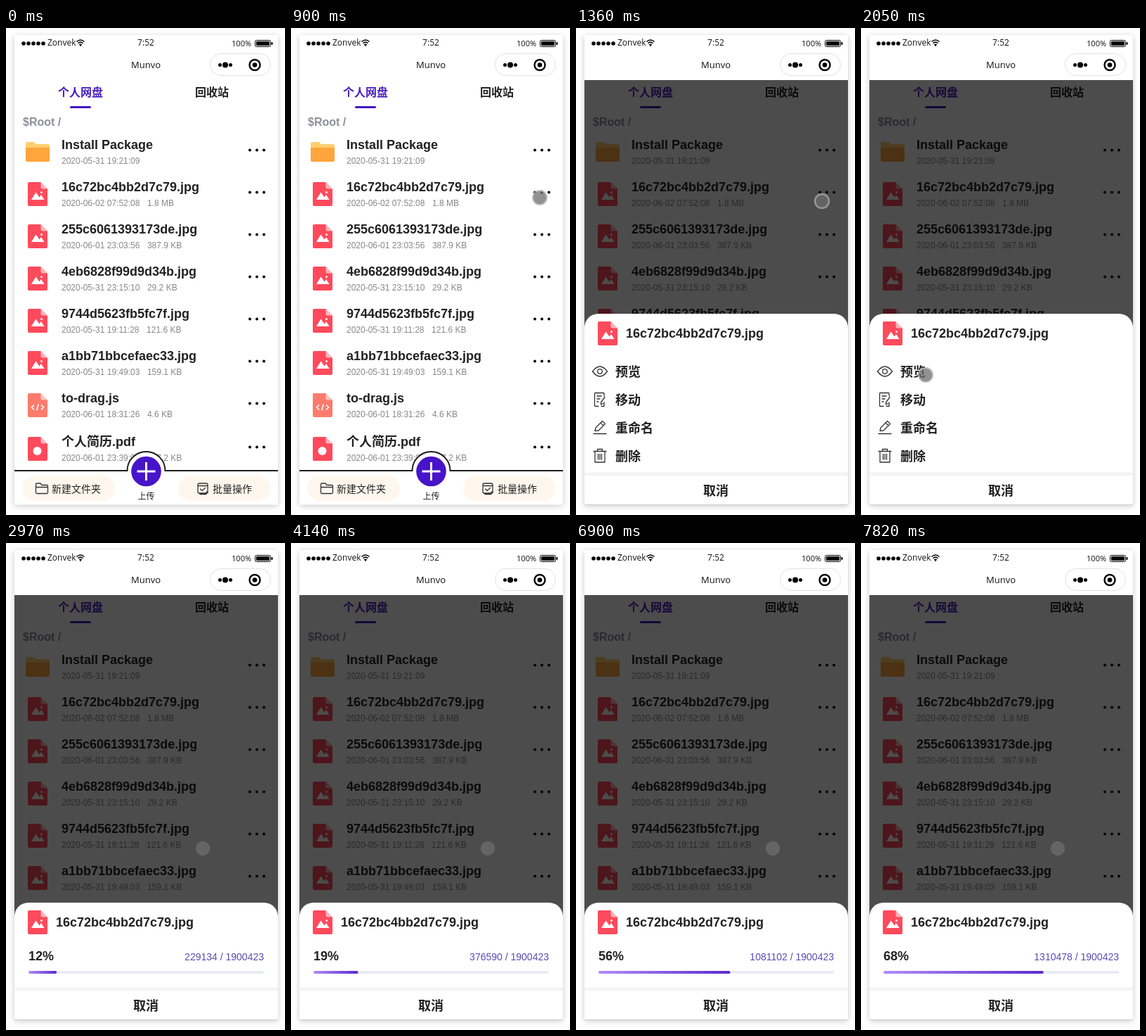
Recreate the animation shown at these times as an HTML page. Size 397x692 px, loop 8000 ms.

```html
<!DOCTYPE html>
<html lang="zh">
<head>
<meta charset="utf-8">
<title>个人网盘</title>
<style>
  html, body { margin: 0; width: 100%; height: 100%; overflow: hidden; background: #fff; }
  svg { display: block; width: 397px; height: 692px; }
  text { font-family: "Liberation Sans", Arial, "Noto Sans CJK SC", "Noto Sans CJK", sans-serif; fill: #222; }
  .ui { font-family: "Open Sans", "Noto Sans", sans-serif; fill: #111; }
  .name { font-size: 18px; font-weight: 700; }
  .meta { font-size: 12px; fill: #888; }
  .tab { font-size: 16px; font-weight: 700; }
  .label { font-size: 14px; fill: #222; }
  .mid { text-anchor: middle; }
  .end { text-anchor: end; }
  .line { fill: none; stroke: #333; stroke-width: 1.3; stroke-linejoin: round; stroke-linecap: round; }
  .card { fill: #fff; filter: drop-shadow(0 2px 4px rgba(0, 0, 0, .22)); }
  #count { font-size: 14px; fill: #5a4bb4; }
  #cursor { fill: rgba(108, 108, 108, .75); }
</style>
</head>
<body>
<svg viewBox="0 0 397 692">
  <defs>
    <clipPath id="frame"><rect x="12" y="10" width="375" height="667.5"/></clipPath>
    <linearGradient id="fade">
      <stop offset="0" stop-color="#b08cfa"/>
      <stop offset="1" stop-color="#5b2bd0"/>
    </linearGradient>
    <g id="sheetOfPaper">
      <path d="M2 0H18.500L28 9.500V32a2 2 0 0 1-2 2H2a2 2 0 0 1-2-2V2a2 2 0 0 1 2-2z"/>
      <path d="M18.500 0L28 9.500H20.500a2 2 0 0 1-2-2z" fill="#fff" fill-opacity=".58"/>
    </g>
    <g id="jpg">
      <use href="#sheetOfPaper" fill="#ff4a5c"/>
      <path d="M5 25L11.500 14.500 16.500 21.500 19 18 23.500 25z" fill="#fff"/>
      <circle cx="19.500" cy="14.500" r="1.500" fill="#fff"/>
    </g>
    <g id="js">
      <use href="#sheetOfPaper" fill="#fc7b6c"/>
      <path d="M9 16.500L5.500 20 9 23.500M19 16.500L22.500 20 19 23.500M15.300 15.500L12.700 24.500"
        fill="none" stroke="#fff" stroke-width="1.600"/>
    </g>
    <g id="pdf">
      <use href="#sheetOfPaper" fill="#ff4a5c"/>
      <circle cx="13.500" cy="20" r="6" fill="#fff"/>
    </g>
    <g id="folder">
      <path d="M-3 5a2 2 0 0 1 2-2H9l3 3H29a2 2 0 0 1 2 2V14H-3z" fill="#ffcf6e"/>
      <path d="M-3 11H31V29a2 2 0 0 1-2 2H-1a2 2 0 0 1-2-2z" fill="#ffa53c"/>
    </g>
  </defs>

  <rect class="card" x="12" y="10" width="375" height="667"/>

  <g clip-path="url(#frame)">
    <!-- status bar and title bar -->
    <g id="signal" fill="#000"></g>
    <text class="ui" x="59" y="25" font-size="12">Zonvek</text>
    <g fill="none" stroke="#000" stroke-width="1.500">
      <path d="M100.500 19.500Q106 14.500 111.500 19.500M102.500 21.800Q106 18.500 109.500 21.800M104.300 24Q106 22.300 107.700 24"/>
      <rect x="354.500" y="17.500" width="22" height="9" rx="2" stroke-width="1"/>
    </g>
    <circle cx="106" cy="25" r="1"/>
    <rect x="356" y="19" width="19" height="6" rx="1"/>
    <rect x="377.500" y="20" width="2" height="4" rx="1"/>
    <text class="ui mid" x="199" y="25" font-size="12">7:52</text>
    <text class="ui end" x="349" y="26" font-size="11">100%</text>
    <text class="ui mid" x="199" y="57" font-size="13">Munvo</text>
    <rect x="290.500" y="36.500" width="86" height="31" rx="15.500" fill="#fff" stroke="#e2e2e2"/>
    <circle cx="304.500" cy="52.500" r="2.500"/><circle cx="312" cy="52.500" r="4"/><circle cx="319.500" cy="52.500" r="2.500"/>
    <circle cx="354" cy="52.500" r="7.500" fill="none" stroke="#000" stroke-width="2.400"/>
    <circle cx="354" cy="52.500" r="3.300"/>

    <!-- file list -->
    <text class="tab mid" x="106" y="97" style="fill:#4a1fc0">个人网盘</text>
    <rect x="91" y="111" width="30" height="3" rx="1.500" fill="#4615c4"/>
    <text class="tab mid" x="293" y="97">回收站</text>
    <text class="tab" x="24" y="139" style="fill:#8f8f9b">$Root /</text>
    <g id="list"></g>

    <!-- bottom bar -->
    <path d="M10 629H172.500A27 27 0 0 1 226.500 629H390V680H10z" fill="#fff" stroke="#1c1c1c" stroke-width="2"/>
    <circle cx="199.500" cy="630" r="21.300" fill="#4714c9"/>
    <path d="M199.500 617V643M186.500 630H212.500" stroke="#fff" stroke-width="3"/>
    <text class="mid" x="199.500" y="670" font-size="12">上传</text>
    <rect x="23" y="636" width="132" height="36" rx="18" fill="#fff7ee"/>
    <rect x="245" y="636" width="131" height="36" rx="18" fill="#fff7ee"/>
    <path class="line" d="M42.500 648.500a1.500 1.500 0 0 1 1.500-1.500h5l2 2.500h7a1.500 1.500 0 0 1 1.500 1.500v9a1.500 1.500 0 0 1-1.500 1.500h-14a1.500 1.500 0 0 1-1.500-1.500zM42.500 652.500h17"/>
    <text class="label" x="65" y="660">新建文件夹</text>
    <path class="line" d="M275 647h10a2 2 0 0 1 2 2v9l-3 3h-9a2 2 0 0 1-2-2v-10a2 2 0 0 1 2-2zM273 650.500h14M276.500 655l2.500 2.500 4.500-4M275 661.500l1.500 1h8l3-3"/>
    <text class="label" x="294" y="660">批量操作</text>

    <rect id="shade" x="12" y="74" width="375" height="604"/>

    <!-- action menu, drawn from its own top edge -->
    <g id="menu">
      <path d="M12 274V20a20 20 0 0 1 20-20H367a20 20 0 0 1 20 20V274z" fill="#fff"/>
      <use href="#jpg" x="31" y="11"/>
      <text class="name" x="71" y="34">16c72bc4bb2d7c79.jpg</text>
      <g class="line">
        <path d="M23.500 82Q34 68 44.500 82Q34 96 23.500 82z"/>
        <circle cx="34" cy="82" r="3.300"/>
        <path d="M40 117V113.500a1 1 0 0 0-1-1H27.500a1 1 0 0 0-1 1V130.500a1 1 0 0 0 1 1H32M30 117H36M30 121H34M30 125H32M41 118.500L35.500 126V129L38.500 127.500M36 131.500H40V126"/>
        <path d="M27 166.500L28 162 37.500 152.500 41.500 156.500 32 166 27 166.500M35 155L39 159M25 170.500H43"/>
        <path d="M25 195.500H43M30.500 195.500V192.500H37.500V195.500M27 195.500V211H41V195.500M31.500 199.500V207M34 199.500V207M36.500 199.500V207"/>
      </g>
      <g id="actions"></g>
      <rect x="12" y="225.500" width="375" height="5" fill="#f4f4f4"/>
      <text class="name mid" x="199" y="257.500">取消</text>
    </g>

    <!-- download panel -->
    <g id="load">
      <path d="M12 680V531a20 20 0 0 1 20-20H367a20 20 0 0 1 20 20V680z" fill="#fff"/>
      <use href="#jpg" x="31" y="522"/>
      <text class="name" x="71" y="545">16c72bc4bb2d7c79.jpg</text>
      <text class="name" id="percent" x="32" y="593"></text>
      <text class="end" id="count" x="367" y="593"></text>
      <rect x="32" y="608" width="335" height="4" rx="2" fill="#e9ebf2"/>
      <rect id="bar" x="32" y="608" height="4" rx="2" fill="url(#fade)"/>
      <rect x="12" y="631.500" width="375" height="5" fill="#f4f4f4"/>
      <text class="name mid" x="199" y="663.500">取消</text>
    </g>
  </g>
  <circle id="cursor"/>
</svg>

<script>
  const $ = id => document.getElementById(id);
  const set = (id, attrs) => {
    for (const key in attrs) $(id).setAttribute(key, attrs[key]);
  };
  const dots = (xs, y, r) => xs.map(x => `<circle cx="${x}" cy="${y}" r="${r}"/>`).join('');

  const files = [
    ['folder', 'Install Package', '2020-05-31 19:21:09', ''],
    ['jpg', '16c72bc4bb2d7c79.jpg', '2020-06-02 07:52:08', '1.8 MB'],
    ['jpg', '255c6061393173de.jpg', '2020-06-01 23:03:56', '387.9 KB'],
    ['jpg', '4eb6828f99d9d34b.jpg', '2020-05-31 23:15:10', '29.2 KB'],
    ['jpg', '9744d5623fb5fc7f.jpg', '2020-05-31 19:11:28', '121.6 KB'],
    ['jpg', 'a1bb71bbcefaec33.jpg', '2020-05-31 19:49:03', '159.1 KB'],
    ['js', 'to-drag.js', '2020-06-01 18:31:26', '4.6 KB'],
    ['pdf', '个人简历.pdf', '2020-06-01 23:39:07', '127.2 KB']
  ];

  $('signal').innerHTML = dots([25, 32, 39, 46, 53], 22, 2.8);
  $('list').innerHTML = files.map(([icon, name, date, size], i) => {
    const y = 60 * i + (icon === 'pdf' ? 2 : 0);
    return `<use href="#${icon}" x="31" y="${159 + y}"/>
      <text class="name" x="79" y="${172 + y}">${name}</text>
      <text class="meta" x="79" y="${193 + y}">${date}<tspan dx="10.5">${size}</tspan></text>
      ${dots([347, 357, 367], 173.5 + y, 2)}`;
  }).join('');
  $('actions').innerHTML = ['预览', '移动', '重命名', '删除'].map((label, i) =>
    `<text class="name" x="56" y="${88.5 + 40 * i}">${label}</text>`).join('');

  // Linear path through [step, ...values] points
  function along(points, step) {
    const i = points.findIndex(p => p[0] >= step);
    if (i < 0) return points[points.length - 1].slice(1);
    if (i === 0) return points[0].slice(1);
    const a = points[i - 1], b = points[i];
    const u = (step - a[0]) / (b[0] - a[0]);
    return a.slice(1).map((v, j) => v + (b[j + 1] - v) * u);
  }

  const LOOP = 8000, TOTAL = 1900423, FIRST = 16142, CHUNK = 16384;
  const OPENING = 5, OPEN = 6, LOADING = 10;
  const pointer = [[1, 381, 330], [2, 370, 280], [4, 354, 241], [5, 354, 241],
    [6, 350, 246], [7, 245, 372], [8, 112, 478], [9, 92, 493], [10, 92, 493], [12, 280, 434]];
  const chunks = [[10, 2], [13, 13], [16, 19], [17, 19], [18, 22], [26, 50], [34, 79]];

  function stepAt(t) {
    return t < 210 ? 0 : Math.floor((t - (t < 3450 ? 210 : 230)) / 230) + 1;
  }

  function draw(step) {
    const loading = step >= LOADING;
    set('shade', { opacity: step < OPENING ? 0 : step === OPENING ? .33 : .7 });
    set('menu', {
      visibility: step >= OPENING && !loading ? 'visible' : 'hidden',
      transform: `translate(0 ${step < OPEN ? 582 : 406})`
    });
    set('load', { visibility: loading ? 'visible' : 'hidden' });

    const [x, y] = along(pointer, step);
    set('cursor', {
      visibility: step ? 'visible' : 'hidden', cx: x, cy: y, r: loading ? 9.5 : 10,
      stroke: loading ? 'rgba(130,130,130,.5)' : 'rgba(185,185,185,.65)',
      'stroke-width': loading ? 1 : 2.5
    });

    const bytes = FIRST + CHUNK * Math.round(along(chunks, step)[0]);
    const percent = Math.floor(100 * bytes / TOTAL);
    $('percent').textContent = percent + '%';
    $('count').textContent = `${bytes} / ${TOTAL}`;
    set('bar', { width: 335 * percent / 100 });
  }

  let shown = -1;
  function tick() {
    const step = stepAt(performance.now() % LOOP);
    if (step !== shown) draw(shown = step);
    requestAnimationFrame(tick);
  }
  tick();
</script>
</body>
</html>
```
